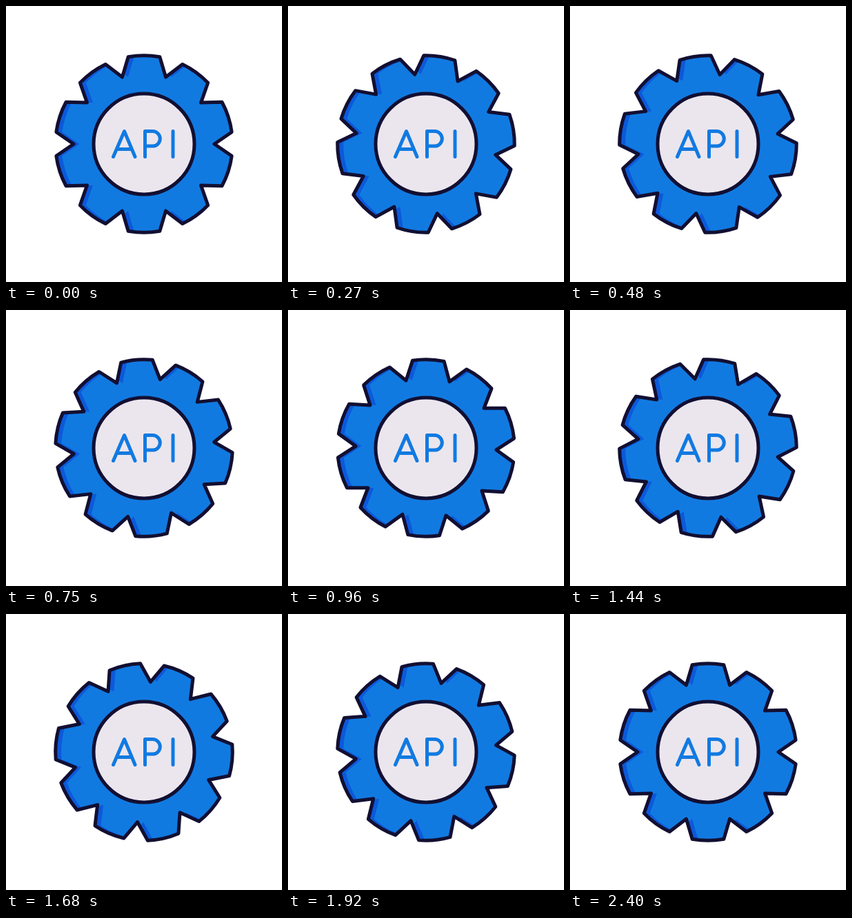
An HTML page with a canvas that plays this animation: 400x400 px, repeating every 4430 ms.

```html
<!DOCTYPE html>
<html lang="en">
<head>
<meta charset="utf-8">
<title>API gear</title>
<style>
html, body { margin: 0; width: 100%; height: 100%; overflow: hidden; background: #fff; }
canvas { display: block; width: 400px; height: 400px; }
</style>
</head>
<body>
<canvas id="stage" width="400" height="400"></canvas>
<script>
const ctx = document.getElementById('stage').getContext('2d');
const LOOP = 4430, SPIN = 2400, STEP = 30;
const INK = '#120f32', BLUE = '#117ae1', SHADE = '#0c59da', PALE = '#ebe6ee';
const RAD = Math.PI / 180;
const TEETH = 10, OUTER = 128.3, ROOT = 102, HALF = 10.25 * RAD;
const SHADE_SHIFT = 8.5;

// Time warp applied before the ease: [time, warped time]
const WARP = [[0, 0], [0.2, 0.17], [0.3125, 0.2762], [0.5, 0.4735], [0.6, 0.581], [0.8, 0.7883], [1, 1]];

const secant = i => (WARP[i + 1][1] - WARP[i][1]) / (WARP[i + 1][0] - WARP[i][0]);

function slope(i) {
  const last = WARP.length - 1;
  if (i === 0) return 0.82;
  if (i === last) return secant(last - 1);
  const before = WARP[i][0] - WARP[i - 1][0];
  const after = WARP[i + 1][0] - WARP[i][0];
  return (secant(i - 1) * after + secant(i) * before) / (before + after);
}

function warp(x) {
  let i = 0;
  while (i < WARP.length - 2 && x > WARP[i + 1][0]) i++;
  const [x0, y0] = WARP[i], [x1, y1] = WARP[i + 1];
  const h = x1 - x0, u = (x - x0) / h, v = 1 - u;
  return y0 * (1 + 2 * u) * v * v + y1 * u * u * (3 - 2 * u)
    + h * u * v * (slope(i) * v - slope(i + 1) * u);
}

function spinAngle(ms) {
  if (ms >= SPIN) return 0;
  const w = warp(ms / SPIN);
  return 2 * Math.PI * w * w * (3 - 2 * w);
}

function gear(angle) {
  const path = new Path2D();
  const pitch = 2 * Math.PI / TEETH;
  for (let i = 0; i < TEETH; i++) {
    const mid = angle + i * pitch - Math.PI / 2;
    const root = mid + pitch / 2;
    path.arc(0, 0, OUTER, mid - HALF, mid + HALF);
    path.lineTo(ROOT * Math.cos(root), ROOT * Math.sin(root));
  }
  path.closePath();
  return path;
}

const hub = new Path2D();
hub.arc(0, 0, 73, 0, 2 * Math.PI);

const letters = new Path2D(
  'M155.5 218.5 L171.5 181.5 L187 218.5 M161 207.5 H181.5 ' +
  'M201.5 218.5 V181.5 H212.5 a10.8 10.8 0 0 1 0 21.6 H201.5 ' +
  'M242 181.5 V218.5');

function outline(path, color) {
  ctx.strokeStyle = color;
  ctx.stroke(path);
}

function fill(path, color) {
  ctx.fillStyle = color;
  ctx.fill(path);
}

function draw(ms) {
  const shape = gear(spinAngle(ms));
  ctx.fillStyle = '#fff';
  ctx.fillRect(0, 0, 400, 400);
  ctx.lineWidth = 5;
  ctx.lineCap = ctx.lineJoin = 'round';

  ctx.save();
  ctx.translate(200, 200);
  fill(shape, SHADE);
  ctx.save();
  ctx.clip(shape);
  ctx.translate(SHADE_SHIFT, 0);
  fill(shape, BLUE);
  ctx.restore();
  outline(shape, INK);
  fill(hub, PALE);
  outline(hub, INK);
  ctx.restore();

  outline(letters, BLUE);
}

const start = performance.now();

function tick() {
  const ms = (performance.now() - start) % LOOP;
  draw(Math.floor(ms / STEP) * STEP);
  requestAnimationFrame(tick);
}
tick();
</script>
</body>
</html>
```
